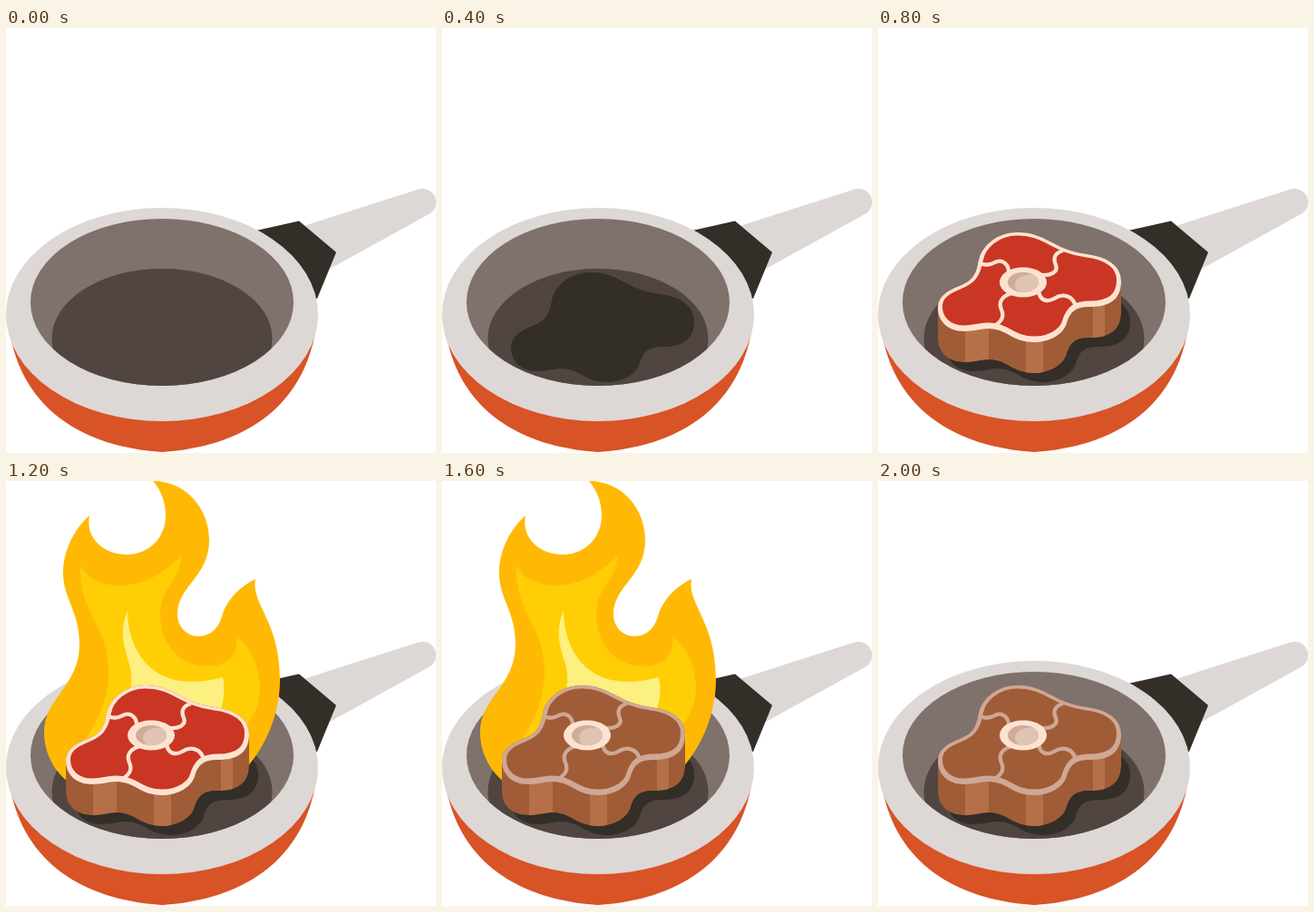
Animation of 474x468 px, one loop 2400 ms. Source, as an HTML page:

```html
<!DOCTYPE html>
<html lang="en">
<head>
<meta charset="utf-8">
<title>Steak in a pan</title>
<style>
  html, body { margin: 0; width: 100%; height: 100%; overflow: hidden; background: #fff; }
  svg { display: block; width: 474px; height: 468px; }
  #steak { --meat: #c93624; --fat: #fee2d0; }
  #steak.cooked { --meat: #a05c36; --fat: #cfa795; }
</style>
</head>
<body>
<svg viewBox="0 0 474 468">
  <defs>
    <path id="cut" d="M66 308c0 15 11 26 29 26c12 0 18-3 26-3c22 0 26 15 51 15c19 0 33-10 36-21c4-13 10-18 26-18c21 0 34-8 34-28
      C268 262 253 252 230 249C195 245 185 225 154 225C130 225 114 241 111 256C108 274 102 279 90 284C74 290 66 297 66 308Z"/>
    <path id="side" d="M66 308v34c0 15 11 26 29 26c12 0 18-3 26-3c22 0 26 15 51 15c19 0 33-10 36-21c4-13 10-18 26-18c21 0 34-8 34-28v-34Z"/>
    <ellipse id="inside" cx="172" cy="302" rx="145" ry="92"/>
    <ellipse id="marrow" cx="160" cy="280" rx="17" ry="11"/>
    <clipPath id="cutClip"><use href="#cut"/></clipPath>
    <clipPath id="sideClip"><use href="#side"/></clipPath>
    <clipPath id="insideClip"><use href="#inside"/></clipPath>
    <clipPath id="marrowClip"><use href="#marrow"/></clipPath>
  </defs>

  <g id="pan">
    <path fill="#ddd8d5" d="M325 219L455 177.500A15 15 0 0 1 468 204L350 269Z"/>
    <path fill="#332e28" d="M276 223L323 212.500L364 247L343 298L290 290Z"/>
    <path fill="#d85326" d="M5 340C21 420 84 461 172 467C260 461 323 420 340 340Z"/>
    <ellipse cx="172" cy="315.500" rx="172" ry="117.500" fill="#ddd8d5"/>
    <use href="#inside" fill="#7f716b"/>
    <ellipse cx="172" cy="342" rx="121.500" ry="77" fill="#504540" clip-path="url(#insideClip)"/>
  </g>

  <use id="sauce" href="#cut" x="10" y="44" fill="#332e28"/>

  <g id="flame">
    <path fill="#ffb905" d="M162 0C199 0 224 31 224 65C224 106 189 115 189 147C189 160 199 171 212 171C227 171 235 160 238 149
      C243 131 258 116 275 108C270 136 302 154 302 219C302 255 287 292 264 317L68 331C52 318 42 298 42 277C42 238 81 226 81 180
      C81 143 63 130 63 101C63 77 75 53 92 38C87 64 109 81 133 81C158 81 176 62 176 38C176 24 171 10 162 0Z"/>
    <path fill="#ffce05" d="M82 93C91 110 108 115 126 115C153 115 177 100 194 81C191 113 170 116 170 147C170 178 190 204 222 204
      C243 204 257 193 254 170C270 184 280 206 280 227C280 247 272 261 262 272L89 283C101 264 113 240 113 210
      C113 158 80 146 82 93Z"/>
    <path fill="#fbf080" d="M134 143C134 182 158 238 239 216C242 230 240 240 237 252L134 246C137 231 140 219 137 205C132 187 123 168 134 143Z"/>
  </g>

  <g id="steak">
    <g clip-path="url(#sideClip)">
      <use href="#side" fill="#a05c36"/>
      <path fill="#b5704a" d="M96 300h26v80h-26zM163 300h19v90h-19zM237 270h13v90h-13z"/>
    </g>
    <g clip-path="url(#cutClip)" style="stroke: var(--fat)">
      <use href="#cut" y="-1.500" style="fill: var(--meat)" stroke-width="10"/>
      <path fill="none" stroke-width="4.300" d="M110 258C117 262 124 261 129 258C137 254 145 260 144 271
        M204 245C194 248 193 254 196 261C199 269 190 273 180 272M177 290C179 301 187 302 194 298C203 292 215 294 218 307
        M147 292C135 296 133 303 136 310C140 319 135 324 127 329"/>
    </g>
    <ellipse cx="160" cy="280" rx="26" ry="16.500" fill="#fee2d0"/>
    <use href="#marrow" fill="#ceac99"/>
    <ellipse cx="168" cy="283" rx="17" ry="11.500" fill="#dfc4b3" clip-path="url(#marrowClip)"/>
  </g>
</svg>
<script>
  const STEP = 400, STEPS = 6;
  const [sauce, flame, steak] = ["sauce", "flame", "steak"].map(id => document.getElementById(id));
  const show = (part, visible) => { part.style.display = visible ? "" : "none"; };

  function draw() {
    const step = Math.floor(performance.now() / STEP) % STEPS;
    show(sauce, step >= 1);
    show(steak, step >= 2);
    show(flame, step === 3 || step === 4);
    steak.classList.toggle("cooked", step >= 4);
    requestAnimationFrame(draw);
  }
  draw();
</script>
</body>
</html>
```
